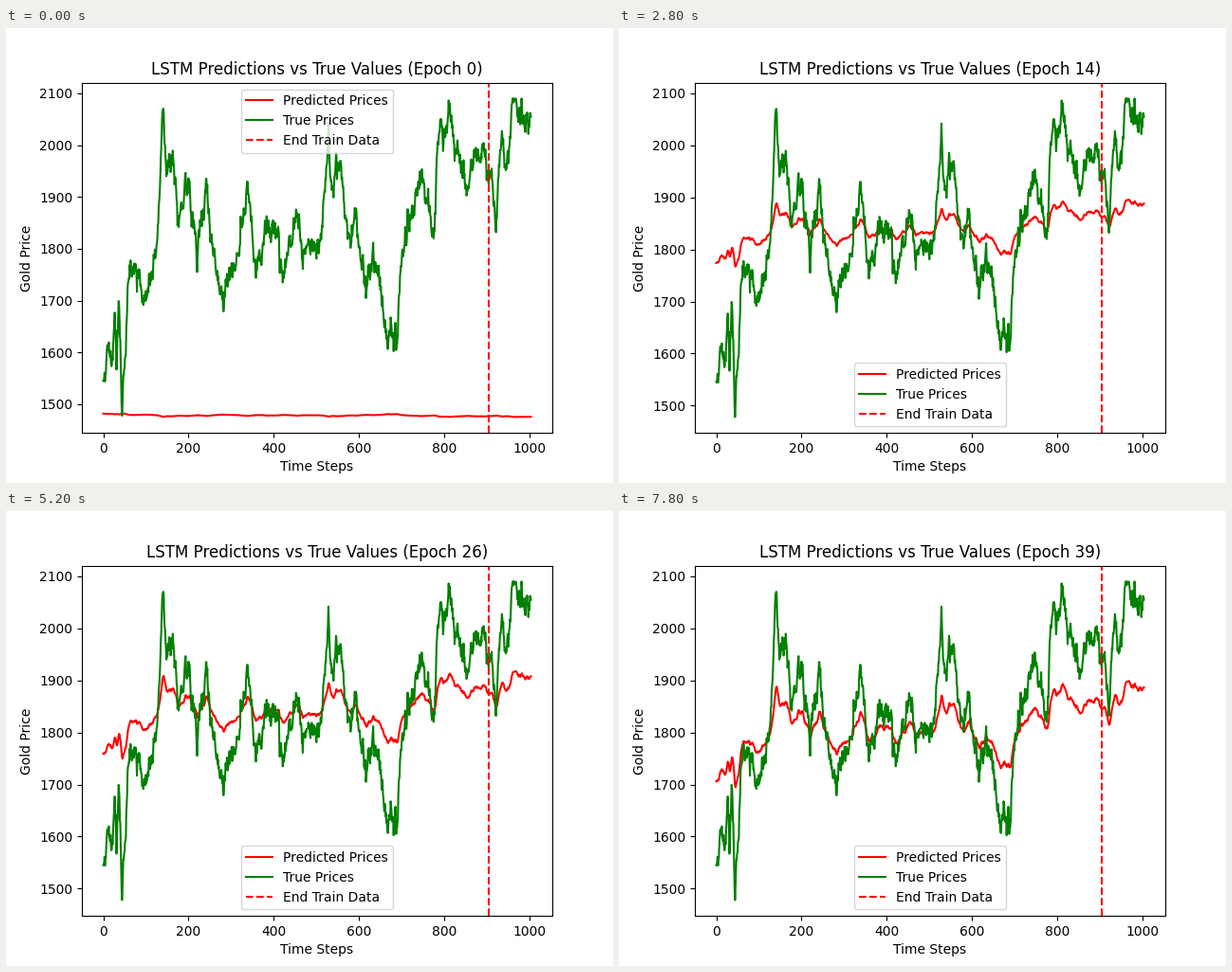
A matplotlib script for the animation above (8000 ms loop, 640x480 px).

```python
import numpy as np
import matplotlib.pyplot as plt
from matplotlib.animation import FuncAnimation

EPOCHS = 40
STEPS = 1004
TRAIN_END = 904

# Main swings of the gold price: (time step, price)
SWINGS = np.array([
    (0, 1545), (20, 1575), (27, 1677), (31, 1567), (38, 1672), (44, 1478),
    (62, 1769), (98, 1700), (126, 1810), (140, 2069), (150, 1945),
    (165, 1965), (173, 1890), (203, 1920), (218, 1800), (242, 1935),
    (250, 1840), (281, 1685), (308, 1765), (341, 1905), (353, 1775),
    (404, 1820), (421, 1735), (456, 1860), (466, 1780), (512, 1830),
    (528, 2042), (534, 1930), (556, 1970), (576, 1830), (594, 1870),
    (616, 1705), (633, 1812), (663, 1645), (691, 1635), (697, 1755),
    (746, 1945), (775, 1820), (785, 2000), (815, 2045), (851, 1918),
    (874, 1995), (911, 1955), (921, 1832), (932, 1990), (946, 1955),
    (961, 2090), (1003, 2055),
])

# Training progress: (epoch, prediction at step 0, response to the price)
FIT = np.array([
    (0, 1482, -.012), (4, 1692, .123), (9, 1888, .27), (14, 1774, .224),
    (20, 1699, .215), (29, 1780, .333), (39, 1706, .355),
])


def ease(x, xs, ys):
    """Smooth curve through the points, level at each turn."""
    d = np.diff(ys) / np.diff(xs)
    inner = np.where(d[1:] * d[:-1] > 0, (d[1:] + d[:-1]) / 2, 0)
    slope = np.concatenate((d[:1], inner, d[-1:]))
    i = min(np.searchsorted(xs, x, side="right") - 1, len(xs) - 2)
    h = xs[i + 1] - xs[i]
    u = (x - xs[i]) / h
    return (ys[i] + u * u * (3 - 2 * u) * (ys[i + 1] - ys[i])
            + u * (1 - u) * h * ((1 - u) * slope[i] - u * slope[i + 1]))


def smooth(values, rate):
    out = values.copy()
    for i in range(1, len(out)):
        out[i] = out[i - 1] + rate * (values[i] - out[i - 1])
    return out


def make_prices():
    """Main swings plus daily noise that vanishes at each turn."""
    t, price = SWINGS.T
    noise = smooth(np.random.default_rng(8).normal(0, 42, STEPS), 0.3)
    noise -= np.interp(steps, t, noise[t])
    return np.clip(np.interp(steps, t, price) + noise, price.min(), price.max())


steps = np.arange(STEPS)
true = make_prices()
shape = smooth(true, 0.4) - true[0]

fig, ax = plt.subplots(figsize=(6.4, 4.8), dpi=100)


def draw(epoch):
    start, gain = (ease(epoch, FIT[:, 0], FIT[:, k]) for k in (1, 2))

    ax.clear()
    ax.plot(steps, start + gain * shape, color="red", label="Predicted Prices")
    ax.plot(steps, true, color="green", label="True Prices")
    ax.axvline(TRAIN_END, color="red", linestyle="--", label="End Train Data")
    ax.set_title(f"LSTM Predictions vs True Values (Epoch {epoch})")
    ax.set_xlabel("Time Steps")
    ax.set_ylabel("Gold Price")
    # The legend keeps clear of the predicted line
    ax.legend(loc="upper center" if start < 1580 else "lower center")


anim = FuncAnimation(fig, draw, frames=EPOCHS, interval=200, repeat=True,
                     repeat_delay=0)
plt.show()
```
